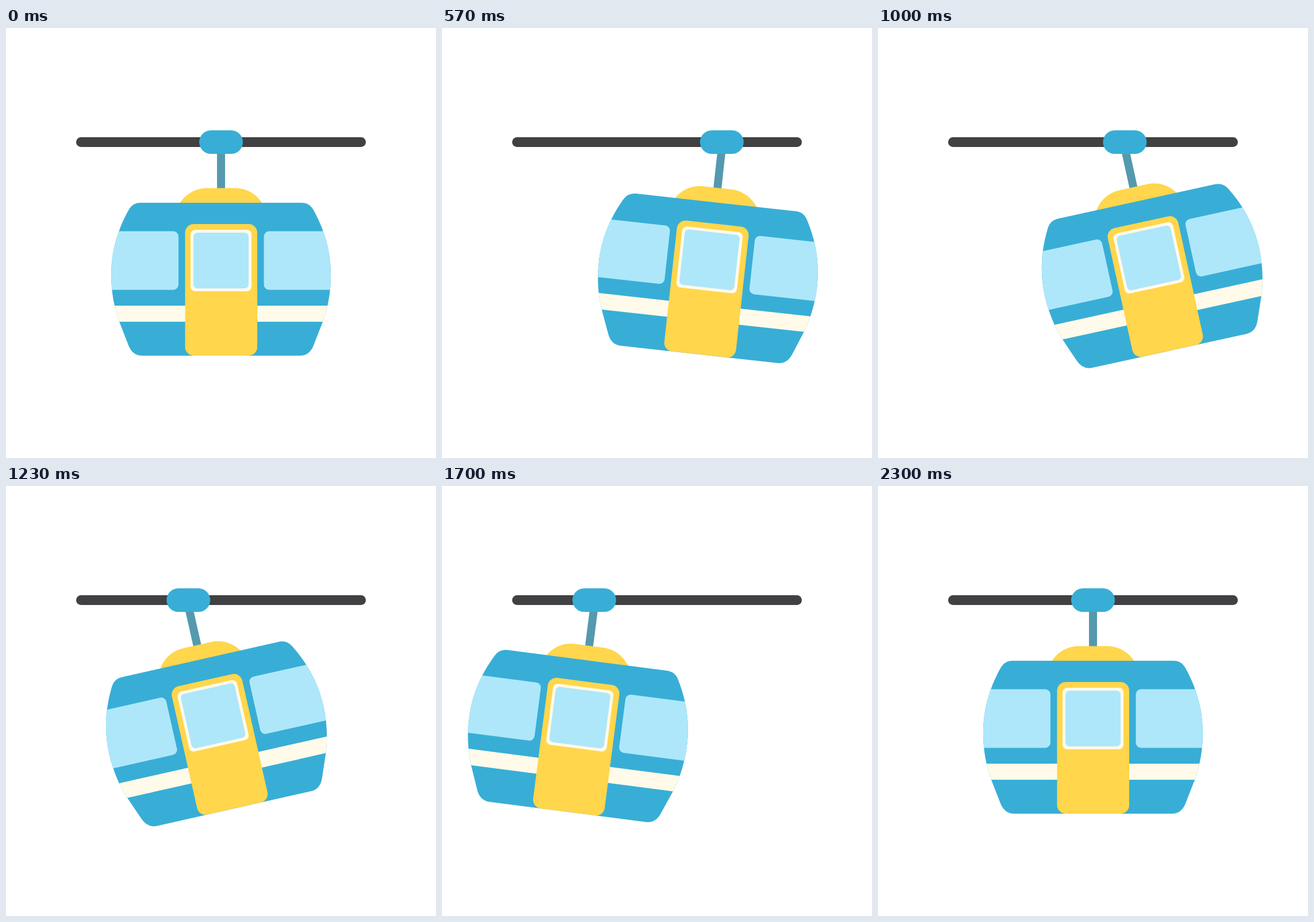
These frames come from a looping animation (748 by 748 pixels, 3.03 s). An HTML page:

```html
<!DOCTYPE html>
<html lang="en">
<head>
<meta charset="utf-8">
<title>Cable car</title>
<style>
  html, body { margin: 0; width: 100%; height: 100%; overflow: hidden; background: #fff; }
  svg { display: block; width: 100%; height: 100%; }
  .blue { fill: #38aed6; }
  .yellow { fill: #ffd64c; }
  .glass { fill: #aee7fa; }
  .cream { fill: #fffae9; }
</style>
</head>
<body>
<svg viewBox="0 0 748 748">
  <defs>
    <path id="shell" d="M234 304H514Q528 304 535 317C556 355 565 392 565 430C565 458 560 487 551 511L535 552Q528 570 511 570H237Q220 570 213 552L197 511C188 487 183 458 183 430C183 392 192 355 213 317Q220 304 234 304Z"/>
    <clipPath id="inside"><use href="#shell"/></clipPath>
  </defs>
  <rect x="122" y="190" width="504" height="17" rx="8.5" fill="#414042"/>
  <g id="car">
    <g id="cabin">
      <rect x="367" y="205" width="14" height="80" fill="#5499ae"/>
      <path class="yellow" d="M302 305C313 288 330 278.500 350 278.500H398C418 278.500 435 288 446 305Z"/>
      <use href="#shell" class="blue"/>
      <g clip-path="url(#inside)">
        <rect class="glass" x="150" y="353.500" width="150" height="102" rx="9"/>
        <rect class="glass" x="448.500" y="353.500" width="150" height="102" rx="9"/>
        <rect class="cream" x="150" y="483" width="448" height="28"/>
      </g>
      <rect class="yellow" x="311.500" y="341" width="125.500" height="229" rx="15"/>
      <rect class="cream" x="321" y="351" width="106" height="107" rx="8"/>
      <rect class="glass" x="326" y="356" width="96" height="97" rx="7"/>
    </g>
    <rect class="blue" x="336" y="178" width="76" height="41" rx="20.500"/>
  </g>
</svg>
<script>
const LOOP = 3030;
// [time in ms, value]
const shiftKeys = [[-10, 0], [730, 128], [1510, -133], [2217, 0]];
const angleKeys = [[0, 0], [330, 13], [1050, -12.7], [1290, -12.7], [1790, 9.2], [2300, 0]];
const car = document.getElementById('car');
const cabin = document.getElementById('cabin');

// Ease in and out between neighbouring keys
function valueAt(keys, t) {
  const next = keys.findIndex(([time]) => time > t);
  if (next < 0) return keys.at(-1)[1];
  const [t0, v0] = keys[next - 1];
  const [t1, v1] = keys[next];
  const p = (t - t0) / (t1 - t0);
  return v0 + (v1 - v0) * p * p * (3 - 2 * p);
}

const start = performance.now();
function draw() {
  const t = (performance.now() - start) % LOOP;
  car.setAttribute('transform', `translate(${valueAt(shiftKeys, t)} 0)`);
  cabin.setAttribute('transform', `rotate(${valueAt(angleKeys, t)} 374 209)`);
  requestAnimationFrame(draw);
}
draw();
</script>
</body>
</html>
```
